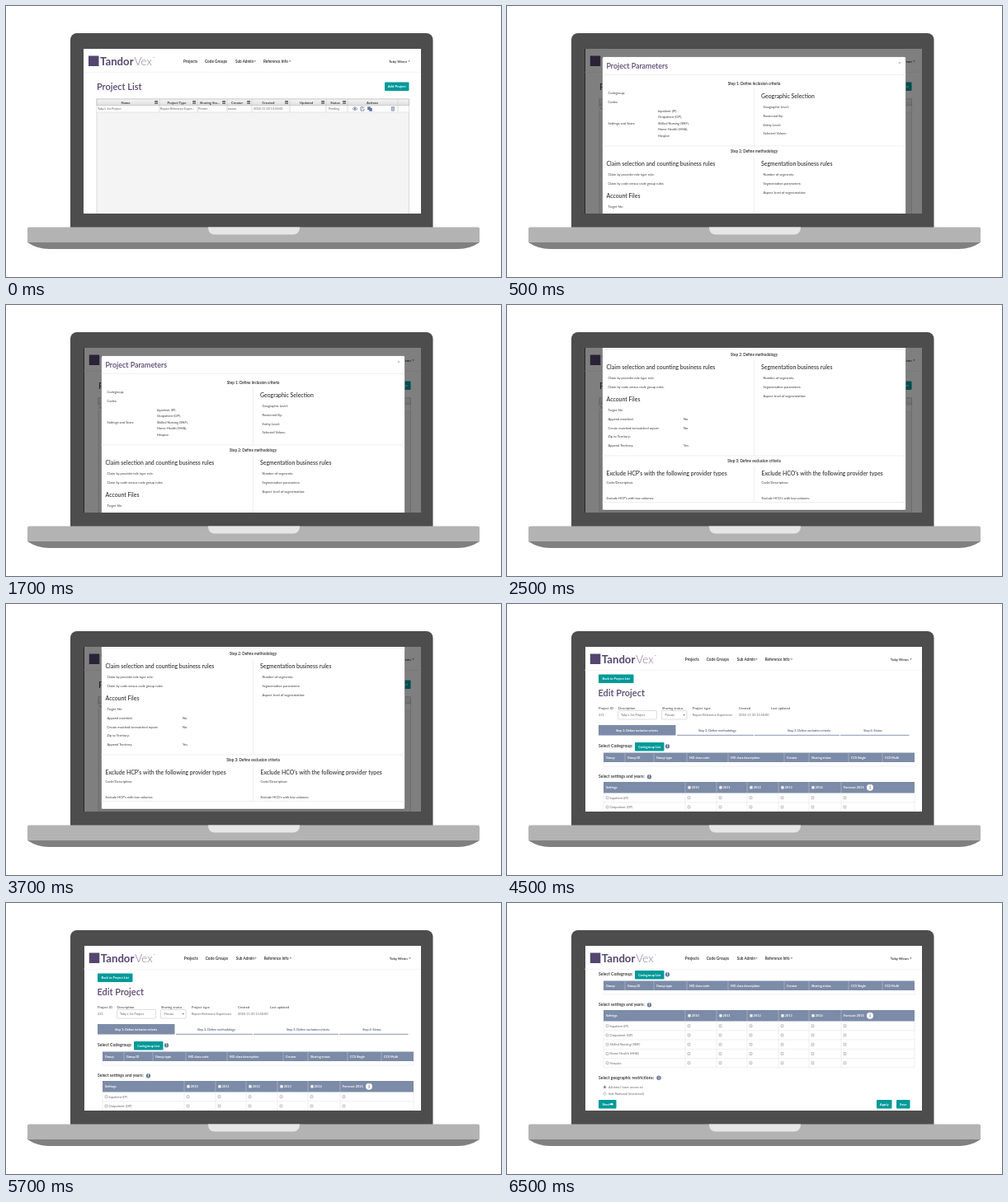
Recreate the animation shown at these times as an HTML page. Size 600 px wide and 329 px high, loop 8000 ms.

```html
<!DOCTYPE html>
<html lang="en">
<head>
<meta charset="utf-8">
<title>Project setup demo</title>
<style>
html, body { margin: 0; width: 100%; height: 100%; overflow: hidden; background: #fff; }
svg { display: block; width: 100vw; height: 100vh; }
text { font-family: Lato, "Open Sans", sans-serif; white-space: pre; }
</style>
</head>
<body>
<svg id="stage" viewBox="0 0 600 329">
  <defs>
    <clipPath id="screenClip"><rect x="94" y="52" width="409" height="200"/></clipPath>
    <clipPath id="pageClip"><rect x="94" y="80.5" width="409" height="172"/></clipPath>
    <linearGradient id="head" x2="0" y2="1">
      <stop offset="0" stop-color="#f6f6f6"/><stop offset="1" stop-color="#dcdcdc"/>
    </linearGradient>
  </defs>
  <path d="M78 270V41a8 8 0 0 1 8-8H509.500a8 8 0 0 1 8 8V270Z" fill="#4d4d4d"/>
  <g clip-path="url(#screenClip)">
    <rect id="screen" x="94" y="52" width="409" height="200" fill="#fff"/>
    <g id="nav"></g>
    <g id="list"></g>
    <g clip-path="url(#pageClip)"><g id="edit"></g></g>
    <g id="dialog">
      <rect x="94" y="52" width="409" height="200" fill="#000" opacity=".5"/>
      <g id="modal"></g>
    </g>
  </g>
  <path d="M26 287H574Q562 295 548 295H52Q38 295 26 287Z" fill="#808080"/>
  <path d="M26 270.500a2 2 0 0 1 2-2H572a2 2 0 0 1 2 2V287H26Z" fill="#b3b3b3"/>
  <path d="M245 268.500H356V269.500a8 8 0 0 1-8 8H253a8 8 0 0 1-8-8Z" fill="#e6e6e6"/>
</svg>
<script>
const NS = "http://www.w3.org/2000/svg";
const $ = id => document.getElementById(id);
const INK = "#3c3c3c", PURPLE = "#54466f", TEAL = "#009999", SLATE = "#7c8ba7", RULE = "#e4e4e4";
const USER = "Toby Wenn", PROJECT = "Toby's 1st Project", STAMP = "2018-11-20 13:50:00";

function add(parent, tag, attrs, body) {
  const el = document.createElementNS(NS, tag);
  for (const k in attrs) el.setAttribute(k, attrs[k]);
  if (body !== undefined) el.textContent = body;
  return parent.appendChild(el);
}

// Drawing helpers bound to one group
function pen(g) {
  const rect = (x, y, x2, y2, fill, more) =>
    add(g, "rect", { x, y, width: x2 - x, height: y2 - y, fill, ...more });
  const path = (d, stroke = RULE, width = .6, fill = "none") =>
    add(g, "path", { d, stroke, "stroke-width": width, fill });
  const text = (x, y, body, size = 4, fill = INK, weight = 400, anchor = "start") =>
    add(g, "text", { x, y, "font-size": size, fill, "font-weight": weight, "text-anchor": anchor }, body);
  const bold = (x, y, body, size = 4, fill = INK, anchor) => text(x, y, body, size, fill, 700, anchor);
  const circle = (cx, cy, r, fill, more) => add(g, "circle", { cx, cy, r, fill, ...more });
  const button = (x, y, x2, body, size = 4) => {
    rect(x, y, x2, y + 10.5, TEAL, { rx: 1 });
    bold((x + x2) / 2, y + 6.7, body, size, "#fff", "middle");
  };
  const info = (x, y, r = 2.7, fill = "#6d7d9d", mark = "#fff") => {
    circle(x, y, r, fill);
    bold(x, y + r * .6, "i", r * 1.7, mark, "middle");
  };
  const caret = (x, y) => path(`M${x} ${y}h2.400l-1.200 1.300Z`, "none", 0, INK);
  const box = (x, y, stroke = "#8a8a8a") =>
    rect(x - 1.5, y - 1.5, x + 1.5, y + 1.5, "#f4f4f4", { rx: .5, stroke, "stroke-width": .5 });
  return { rect, path, text, bold, circle, button, info, caret, box };
}

let userName;
function drawNav() {
  const p = pen($("nav"));
  p.rect(100, 60.5, 112.5, 73, PURPLE);
  p.bold(114, 71.800, "Tandor", 13.2, PURPLE);
  p.text(155.5, 71.800, "Vex", 13.6, "#85799b", 300);
  p.text(178, 64, "™", 3, "#85799b");
  p.bold(215, 68.600, "Projects", 4.7);
  p.bold(241, 68.600, "Code Groups", 4.7);
  p.bold(278, 68.600, "Sub Admin", 4.6);
  p.caret(300.5, 66.500);
  p.bold(312, 68.600, "Reference Info", 4.6);
  p.caret(343, 66.500);
  const name = add($("nav"), "g", {}), q = pen(name);
  q.bold(464, 68.600, USER, 4.4);
  q.caret(487.500, 66.500);
  p.path("M90 80.300H510", "#ebebeb");
  userName = name;
}

function drawList() {
  const p = pen($("list"));
  p.text(110, 102, "Project List", 11, PURPLE, 600);
  p.button(459, 92.5, 488.5, "Add Project", 4.2);
  p.rect(110, 113, 488.5, 260, "#f4f4f4", { stroke: "#c4c4c4", "stroke-width": .6 });
  p.rect(110, 113, 488.5, 121, "url(#head)", { stroke: "#b4b4b4", "stroke-width": .6 });
  p.rect(110.3, 121.3, 488.2, 129, "#fcfcfc");
  p.path("M110 129H488.500", "#d4d4d4", .5);
  const edges = [186, 232, 268, 298, 344, 388, 414, 475];
  const heads = [["Name", 145], ["Project Type", 207], ["Sharing Sta...", 247], ["Creator", 280],
    ["Created", 318], ["Updated", 364], ["Status", 399], ["Actions", 444]];
  edges.forEach((x, i) => {
    p.path(`M${x} 113V129`, "#c0c0c0", .5);
    p.bold(heads[i][1], 118.700, heads[i][0], 4.2, INK, "middle");
    if (i < 7) p.path(`M${x - 5.8} 115.500h3.800m-3.800 1.400h3.800m-3.800 1.400h3.800`, "#333", .8);
  });
  [[111, PROJECT], [187, "Report Reference Exper..."], [233, "Private"], [269, "twenn"],
    [300, STAMP], [391, "Pending"]].forEach(([x, s]) => p.text(x, 126.300, s, 3.7, "#666"));
  const ic = "#66759a";
  p.path("M420 124.700q3-3.600 6 0q-3 3.600-6 0Z", ic, .7);
  p.circle(423, 124.7, 1.1, ic);
  p.path("M433 122.700h-3v4.300h4v-2m-2.400.200l2.700-2.900", ic, .8);
  p.path("M438.500 122.500h3v3.500h-3Zm2 1.500h3v3.500h-3Z", ic, .5, ic);
  p.path("M466.800 122.800h4.200m-3.600 0v4.300h3v-4.300m-1.500 0v4", ic, .7);
}

function drawModal() {
  const p = pen($("modal"));
  const step = (y, s) => p.bold(299.5, y, s, 4.6, INK, "middle");
  const title = (x, y, s) => p.text(x, y, s, 6.9, INK, 600);
  const lines = (x, y, gap, items) => items.forEach((s, i) => p.text(x, y + i * gap, s));
  p.rect(115.5, 61.5, 483.5, 365, "#fff", { rx: 1.5, stroke: "#000", "stroke-opacity": .35, "stroke-width": .8 });
  p.text(120.5, 75.700, "Project Parameters", 8.9, PURPLE, 600);
  p.text(476, 70.600, "×", 6, "#888", 400, "middle");
  p.path("M115.500 83.300H483.500M115.500 170H483.500M115.500 299H483.500M115.500 355.500H483.500M299.500 100V170M299.500 183V299M299.500 311V355.500");

  step(95.700, "Step 1: Define inclusion criteria");
  lines(122.5, 106.900, 10.900, ["Codegroup:", "Codes:"]);
  p.text(122.5, 144.200, "Settings and Years:");
  lines(183, 128.500, 7.600, ["Inpatient (IP),", "Outpatient (OP),", "Skilled Nursing (SNF),", "Home Health (HHA),", "Hospice"]);
  title(308, 112.300, "Geographic Selection");
  lines(310.5, 123.700, 10.900, ["Geographic Level:", "Restricted By:", "Entity Level:", "Selected Values:"]);

  step(178, "Step 2: Define methodology");
  title(120.5, 194.400, "Claim selection and counting business rules");
  lines(122.5, 206.200, 10.900, ["Claim by provider role type rule:", "Claim by code versus code group rules:"]);
  title(308, 194.400, "Segmentation business rules");
  lines(310.5, 206.200, 10.900, ["Number of segments:", "Segmentation parameters:", "Aspect level of segmentation:"]);
  title(120.5, 233.400, "Account Files");
  lines(122.5, 245, 10.800, ["Target file:", "Append matched:", "Create matched/unmatched report:", "Zip to Territory:", "Append Territory:"]);
  lines(214, 255.800, 10.800, ["No", "No"]);
  p.text(214, 288.200, "Yes");

  step(306.700, "Step 3: Define exclusion criteria");
  ["HCP's", "HCO's"].forEach((who, i) => {
    const x = i ? 308.5 : 120.5;
    title(x, 323.300, `Exclude ${who} with the following provider types`);
    lines(x, 332.500, 19.700, ["Code/Description:", `Exclude ${who} with low volumes:`]);
  });
}

function drawEdit() {
  const p = pen($("edit"));
  const GREY = "#666";
  p.button(111, 85.5, 153.5, "Back to Project List", 3.9);
  p.text(110.5, 112, "Edit Project", 11, PURPLE, 600);
  [[111, "Project ID", "231"], [134.5, "Description"], [188, "Sharing status"],
    [225, "Project type", "Report Reference Experience"], [281, "Created", STAMP], [320, "Last updated"]]
    .forEach(([x, label, value]) => {
      p.text(x, 128, label, 4.1);
      if (value) p.text(x, 136.300, value, 3.8, GREY);
    });
  const field = { rx: 1, stroke: "#c8c8c8", "stroke-width": .6 };
  p.rect(134.5, 129.5, 181.5, 140, "#fff", field);
  p.text(138, 136.300, PROJECT, 3.8, GREY);
  p.rect(187.5, 129.5, 218, 140, "#fff", field);
  p.text(191.5, 136.300, "Private", 3.8, GREY);
  p.caret(213.500, 134.300);

  p.rect(111, 147, 204.5, 159.5, SLATE);
  p.path("M206 159.300H299M300 159.300H403M404 159.300H487.500", SLATE, .9);
  [[157.5, "Step 1: Define inclusion criteria"], [255, "Step 2: Define methodology"],
    [366, "Step 3: Define exclusion criteria"], [443.5, "Step 4: Status"]]
    .forEach(([x, s], i) => p.bold(x, 154.500, s, 3.7, i ? "#5e6a80" : "#fff", "middle"));

  p.bold(111, 174.300, "Select Codegroup:", 5.1);
  p.button(155, 168, 190.5, "Codegroup List");
  p.info(194.5, 172.800);

  const cells = (edges, top, bottom, stroke) =>
    edges.forEach(x => p.path(`M${x} ${top}V${bottom}`, stroke, .5));
  p.rect(117, 180.5, 494, 192, SLATE);
  const cols = [143, 178, 218, 268, 336, 366, 414, 455];
  cells(cols, 180.500, 192, "#c5ccd9");
  ["Group", "Group ID", "Group type", "MD class code", "MD class description", "Creator",
    "Sharing status", "CCS Single", "CCS Multi"].forEach((s, i) =>
    p.bold((i ? cols[i - 1] : 117) + 3, 187.600, s, 3.8, "#fff"));
  p.path("M117 192V197H494V192", "#e0e0e0", .5);

  p.bold(111, 211.300, "Select settings and years:", 5);
  p.info(172.5, 209.800);
  p.rect(117, 216, 494, 229.5, SLATE);
  const years = [216, 254, 291, 329, 366, 405];
  cells(years, 216, 229.500, "#c5ccd9");
  p.bold(120, 224, "Settings", 3.8, "#fff");
  years.slice(0, 5).forEach((x, i) => {
    p.box(x + 5, 222.700, "#dfe4ec");
    p.bold(x + 7.800, 224, 2010 + i, 3.8, "#fff");
  });
  p.bold(408, 224, "Forecast 2015", 3.9, "#fff");
  p.info(440, 222.7, 4, "#fff", SLATE);
  ["Inpatient (IP)", "Outpatient (OP)", "Skilled Nursing (SNF)", "Home Health (HHA)", "Hospice"].forEach((s, i) => {
    const y = 235.2 + i * 11.25;
    p.box(121.500, y);
    p.text(124.500, y + 1.300, s, 4, GREY);
    years.forEach(x => p.box(x + 4.500, y));
    p.path(`M117 ${y + 5.600}H494`, "#dedede", .5);
  });
  cells([117, ...years, 494], 229.500, 285.800, "#dedede");

  p.bold(111, 300.200, "Select geographic restrictions:", 5);
  p.info(184, 298.200);
  ["All data I have access to", "Sub-National (restricted)"].forEach((s, i) => {
    const y = 309.5 + i * 8;
    p.circle(118.5, y, 1.6, "#fff", { stroke: "#888", "stroke-width": .5 });
    if (!i) p.circle(118.5, y, .9, "#444");
    p.text(123, y + 1.400, s, 4, GREY);
  });
  p.button(111, 325, 132.5, "Next    ");
  p.path("M124.500 329.600h2.300v-1.300l2.200 2-2.200 2v-1.300h-2.300Z", "none", 0, "#fff");
  p.button(448, 325, 466.5, "Apply", 4.2);
  p.button(472, 325, 488.5, "Save", 4.2);
}

const show = (id, on) => $(id).setAttribute("display", on ? "inline" : "none");
const move = (el, x, y = 0) => el.setAttribute("transform", `translate(${x} ${y})`);

const LOOP = 8000;
function render(ms) {
  const t = ms % LOOP;
  const modal = t >= 500 && t < 4500, edit = t >= 4500;
  show("list", !edit);
  show("edit", edit);
  show("dialog", modal);
  $("screen").parentNode.style.transform = "none";
  $("screen").setAttribute("x", t < 500 ? 94 : 95);
  move($("nav"), t < 500 ? 0 : .8);
  move(userName, modal ? 4 : 0);
  move($("list"), modal ? 2 : 0);
  move($("modal"), 0, t >= 2500 ? -116 : 0);
  move($("edit"), 0, t >= 6500 ? -86 : 0);
}

drawNav();
drawList();
drawModal();
drawEdit();
const start = performance.now();
function tick() {
  render(performance.now() - start);
  requestAnimationFrame(tick);
}
render(0);
tick();
</script>
</body>
</html>
```
